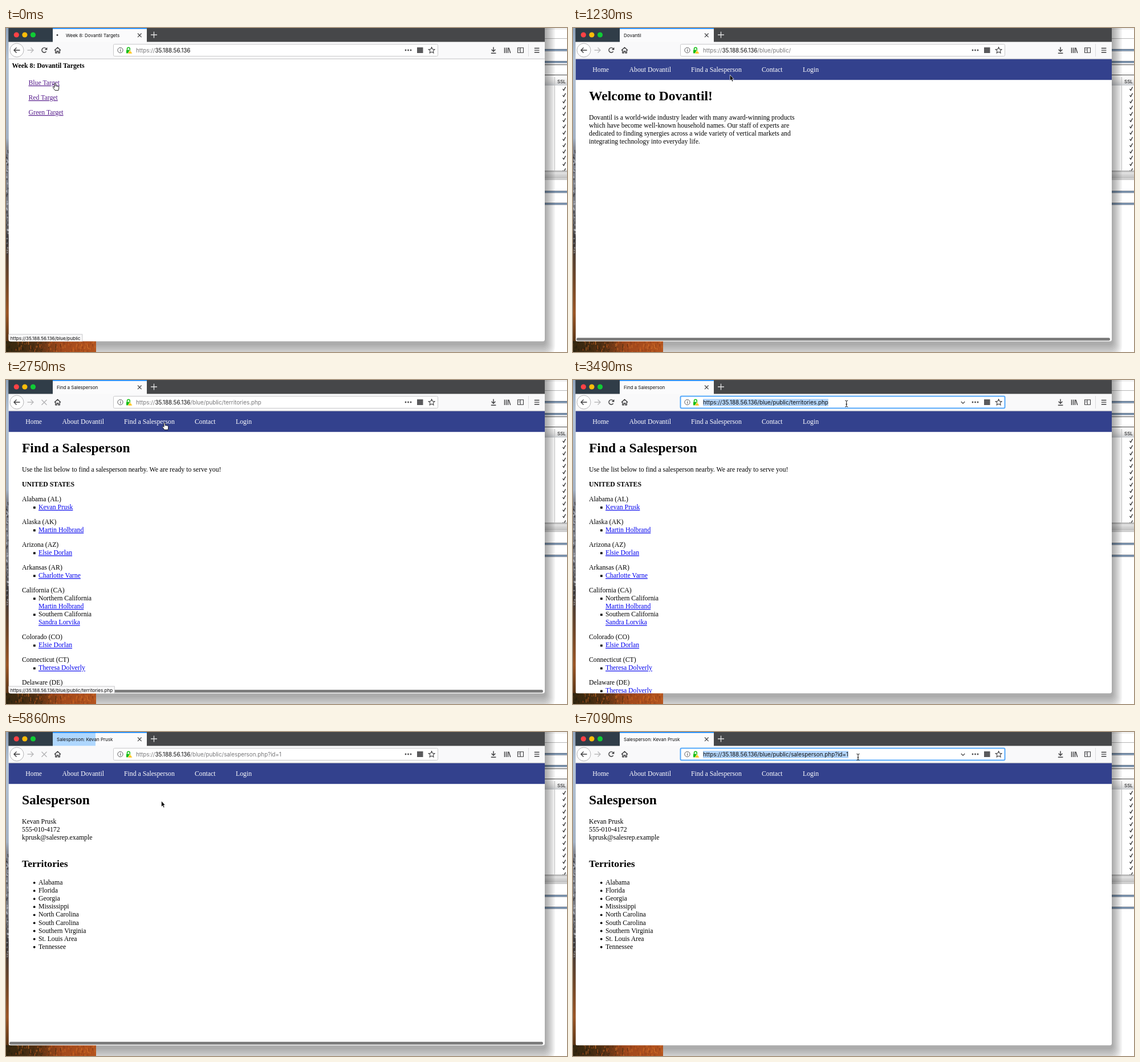
An HTML page that plays this animation: 984 px wide and 569 px high, repeating every 8000 ms.

```html
<!DOCTYPE html>
<html lang="en">
<head>
<meta charset="utf-8">
<title>Browser session</title>
<style>
html, body { margin: 0; width: 100%; height: 100%; overflow: hidden; background: #fff; }
svg { display: block; width: 984px; height: 569px; }
text { white-space: pre; }
.s { font: 11.76px "Liberation Serif", "Times New Roman", serif; }
.b { font-weight: bold; }
.h1 { font-size: 23.52px; }
.h2 { font-size: 17.64px; }
.link { fill: #0000ee; text-decoration: underline; }
.seen { fill: #551a8b; text-decoration: underline; }
.nav { fill: #fff; }
.ui { font: 8.02px Inter, "Open Sans", sans-serif; fill: #0c0c0d; }
.url { font-size: 9.84px; }
.ico { fill: none; stroke: #3c3c3e; stroke-width: 1.4; }
</style>
</head>
<body>
<svg id="stage" viewBox="0 0 984 569" xmlns="http://www.w3.org/2000/svg"></svg>
<script>
const LOOP = 8000, LINE = 14.12, GAP = 25.88;
const HOST = '35.188.56.136';

const TICKS = [0, 150, 310, 470, 610, 780, 940, 1090, 1230, 1380, 1680, 1830, 1980, 2120,
  2270, 2430, 2600, 2750, 2900, 3040, 3190, 3340, 3490, 3970, 4420, 4570, 4720, 4870, 5020,
  5320, 5470, 5710, 5860, 6010, 6180, 6340, 6490, 6640, 6940, 7090];

const PAGES = [
  { at: 0, title: 'Week 8: Dovantil Targets', path: '' },
  { at: 307, title: 'Dovantil', path: '/blue/public/', keepBar: true },
  { at: 2250, title: 'Find a Salesperson', path: '/blue/public/territories.php' },
  { at: 5735, title: 'Salesperson: Kevan Prusk', path: '/blue/public/salesperson.php?id=1' }
];
const LOADS = [[0, 307], [1980, 2250], [5470, 5735]];
const HINTS = [
  [0, 307, '/blue/public'],
  [1680, 2900, '/blue/public/territories.php'],
  [5320, 5735, '/blue/public/salesperson.php?id=1']
];
const FOCUS = [[3340, 5470], [6940, LOOP]];
const SELECT = [[3340, 3970], [6940, LOOP]];

const POINTER = [
  [0, 86, 97, 'hand'], [150, 88, 97, 'hand'], [310, 110, 97, 'arrow'], [470, 136, 96, 'arrow'],
  [780, 215, 92, 'arrow'], [1090, 277, 87, 'arrow'], [1380, 273.5, 77, 'hand'],
  [2600, 273.5, 77, 'hand'], [2750, 278, 75, 'hand'], [2900, 330, 66, 'arrow'],
  [3190, 440, 48, 'beam'], [3340, 480, 41.5, 'beam'], [4420, 478, 42, 'beam'],
  [4570, 400, 80, 'arrow'], [4720, 200, 180, 'arrow'], [4870, 87, 229, 'hand'],
  [5020, 92, 228.5, 'hand'], [5470, 92, 228.5, 'hand'], [5710, 180, 170, 'arrow'],
  [5860, 272.5, 121, 'arrow'], [6010, 340, 92, 'arrow'], [6340, 480, 54, 'arrow'],
  [6490, 496, 48, 'beam'], [6640, 500, 44, 'beam'], [LOOP, 500, 44, 'beam']
];

let seed = 11;
const rnd = () => (seed = seed * 16807 % 2147483647) / 2147483647;
const rect = (x, y, w, h, fill, more = '') =>
  `<rect x="${x}" y="${y}" width="${w}" height="${h}" fill="${fill}" ${more}/>`;
const text = (x, y, str, cls = 's', more = '') =>
  `<text x="${x}" y="${y}" class="${cls}" ${more}>${str}</text>`;
const path = (d, more = 'class="ico"') => `<path d="${d}" ${more}/>`;
const dot = (x, y, r, fill, more = '') => `<circle cx="${x}" cy="${y}" r="${r}" fill="${fill}" ${more}/>`;
const lines = (x, y, list) => list.map((str, i) => text(x, y + i * LINE, str)).join('');
const stops = list => list.map(([o, c]) => `<stop offset="${o}" stop-color="${c}"/>`).join('');
const fade = (id, list) => `<linearGradient id="${id}" x2="0" y2="1">${stops(list)}</linearGradient>`;

function desktop() {
  let out = rect(945, 0, 39, 569, '#fff');
  const rule = y => rect(945, y, 39, 3, '#a9c8e6') + rect(945, y, 39, 1, '#33435a') + rect(945, y + 2.5, 39, 1, '#33435a');
  out += rect(945, 0, 39, 3, '#f1f1f1') + rect(945, 18, 39, 1, '#b5b5b5');
  out += [37, 58, 286, 307].map(rule).join('');
  out += rect(945, 64, 39, 1, '#444') + rect(945, 82, 39, 1, '#444');
  out += rect(945, 86, 39, 15, 'url(#head)') + rect(962, 86, 1, 164, '#c4c4c4') + text(967, 96.5, 'SSL', 'ui', 'font-size="7.4"');
  for (let i = 0; i < 14; i++)
    out += path(`M976.5 ${107 + 11 * i}l1.8 2.6 3.2-6`, 'fill="none" stroke="#222" stroke-width="1.2"');
  out += rect(945, 250.5, 39, 14, 'url(#band)') + rect(945, 265.5, 39, 1, '#9a9a9a');
  for (let i = 1; i < 10; i++)
    out += rect(-30, -30, 975 + 2 * i, 584 + 3 * i, '#000', `rx="${4 + 2 * i}" opacity=".045"`);
  out += rect(0, 0, 5, 569, 'url(#sky)') + rect(0, 550, 158, 19, 'url(#wood)');
  const dark = ['#1d1b10', '#33290f', '#4c2c12'], warm = ['#c65a1c', '#8d3f18', '#d8752c', '#a8481a'];
  for (let i = 0; i < 230; i++) {
    const x = rnd() * 156, set = rnd() * 110 > x ? dark : warm;
    out += rect(x.toFixed(1), (549 + rnd() * 19).toFixed(1), 1.5, (2 + rnd() * 4).toFixed(1),
      set[Math.floor(rnd() * set.length)], 'opacity=".55"');
  }
  for (let i = 0; i < 60; i++)
    out += rect(rnd() * 3, 205 + rnd() * 190, 2, 3, rnd() < .45 ? '#c9ccd4' : '#2e2f34', 'opacity=".55"');
  return out;
}

function chrome() {
  const lights = ['#ff4245', '#fdbc0a', '#10cc35'].map((c, i) => dot(18.3 + 14.6 * i, 12, 4.6, c)).join('');
  return rect(4.5, 0, 940.5, 24.5, '#464749') + rect(4.5, 0, 77.5, 24.5, '#303d48') + lights +
    rect(82, 0, 165, 25, '#fbfbfc') + rect(82, 0, 0, 24.5, '#84c3ff', 'id="burst"') + rect(82, 0, 165, 1.6, '#0a84ff') +
    dot(90, 12.5, 1.4, '#333', 'id="throb"') + text(89, 15.7, '', 'ui', 'id="title"') +
    path('M231 9.5l6.6 6.6m0-6.6l-6.6 6.6', 'class="ico" style="stroke-width:1.1"') +
    path('M254 12h11m-5.5-5.5v11', 'fill="none" stroke="#e4e4e4" stroke-width="1.3"') +
    rect(4.5, 24.5, 940.5, 29.5, '#f9f9fa') + rect(4.5, 53.5, 940.5, 1, '#dcdcde') +
    dot(19, 39, 12, '#fff', 'stroke="#b4b4b6"') + path('M24.5 39H14m4.5-4.5L14 39l4.5 4.5') +
    path('M37.5 39H48m-4.5-4.5L48 39l-4.5 4.5', 'fill="none" stroke="#b9b9bb" stroke-width="1.4"') +
    '<g id="reload">' + path('M70.6 41.2A4.2 4.2 0 1 1 70.2 36') + path('M72.3 34v4.6h-4.6z', 'fill="#3c3c3e"') + '</g>' +
    path('M63 35l8 8', 'id="slash" class="ico"') + path('M62.5 34.7l9 9m0-9l-9 9', 'id="cross" class="ico"') +
    path('M85 39.3l5.5-5 5.5 5M86.8 38.5v5.3h2.4v-3h2.6v3h2.4v-5.3') +
    rect(188.5, 28.5, 569, 21, '#fff', 'id="box" rx="2"') +
    dot(200.5, 39, 4.6, 'none', 'stroke="#5c5c5e"') + rect(200, 38.2, 1.1, 3.4, '#5c5c5e') + rect(200, 36.3, 1.1, 1.1, '#5c5c5e') +
    path('M212.5 39v-2.4a2.4 2.4 0 0 1 4.8 0V39', 'fill="none" stroke="#14bd14" stroke-width="1.5"') + rect(211, 38.5, 7.5, 6, '#14bd14', 'rx=".8"') +
    path('M217.6 38.6l4 6.4h-8z', 'fill="#ffbf00" stroke="#fff" stroke-width=".6"') + rect(217.2, 40.7, .9, 2, '#fff') +
    rect(228, 33, 0, 13, '#b4d6fb', 'id="mark"') +
    '<text id="url" class="ui url" x="228" y="42.7"><tspan>https://</tspan><tspan>' + HOST + '</tspan><tspan></tspan></text>' +
    rect(453, 33.5, 1, 12, '#000', 'id="caret"') +
    path('M680.8 38l3.2 3.2 3.2-3.2', 'id="chev" class="ico" style="stroke-width:1.1"') +
    [701, 705.5, 710].map(x => dot(x, 39, 1.4, '#4a4a4c')).join('') + rect(721, 34, 10.5, 10, '#5a5a5c') +
    path('M746.6 33.7l1.6 3.5 3.8.4-2.8 2.6.8 3.8-3.4-1.9-3.4 1.9.8-3.8-2.8-2.6 3.8-.4z', 'class="ico" style="stroke-width:1.1"') +
    path('M855 33.5v7.5m-3.4-3.2l3.4 3.4 3.4-3.4M850.8 44.2h8.6') +
    path('M874.5 34.5v9.5m3-9.5v9.5m3-9.5v9.5m1.4-9.3l2.8 9.3') +
    path('M897.5 34.7h10v8.6h-10zM902.2 34.7v8.6', 'class="ico" style="stroke-width:1.1"') + path('M899 37h1.8m-1.8 2h1.8', 'class="ico" style="stroke-width:.8"') +
    rect(916, 28, 1, 22, '#dcdcde') + path('M926.8 35.5h8.6m-8.6 3.6h8.6m-8.6 3.6h8.6');
}

function listing() {
  const M = 'Martin Holbrand', E = 'Elsie Dorlan', D = 'Theresa Dolverly';
  const states = [['Alabama (AL)', 'Kevan Prusk'], ['Alaska (AK)', M], ['Arizona (AZ)', E],
    ['Arkansas (AR)', 'Charlotte Varne'],
    ['California (CA)', '-Northern California', M, '-Southern California', 'Sandra Lorvika'],
    ['Colorado (CO)', E], ['Connecticut (CT)', D], ['Delaware (DE)', D]];
  let y = 213, out = '';
  for (const [name, ...rows] of states) {
    out += text(28, y, name);
    rows.forEach((row, i) => {
      y += LINE;
      const plain = row[0] === '-';
      if (plain || i === 0) out += rect(48, y - 4.9, 3.7, 3.7, '#000');
      out += text(57, y, plain ? row.slice(1) : row, plain ? 's' : 's link');
    });
    y += GAP;
  }
  return out;
}

function pages() {
  const areas = ['Alabama', 'Florida', 'Georgia', 'Mississippi', 'North Carolina', 'South Carolina',
    'Southern Virginia', 'St. Louis Area', 'Tennessee'];
  const big = str => text(28, 127, str, 's b h1');
  const bodies = [
    text(10.5, 70, 'Week 8: Dovantil Targets', 's b') +
      ['Blue', 'Red', 'Green'].map((c, i) => text(39.5, 100 + i * 26, c + ' Target', 's seen')).join(''),
    big('Welcome to Dovantil!') + lines(28, 161, [
      'Dovantil is a world-wide industry leader with many award-winning products',
      'which have become well-known household names. Our staff of experts are',
      'dedicated to finding synergies across a wide variety of vertical markets and',
      'integrating technology into everyday life.']),
    big('Find a Salesperson') + text(28, 161, 'Use the list below to find a salesperson nearby. We are ready to serve you!') +
      text(28, 187, 'UNITED STATES', 's b') + listing(),
    big('Salesperson') + lines(28, 161, ['Kevan Prusk', '555-010-4172', 'kprusk@salesrep.example']) +
      text(28, 237, 'Territories', 's b h2') + lines(57, 268, areas) +
      areas.map((a, i) => dot(49.7, 264.8 + i * LINE, 1.9, '#000')).join('')
  ];
  const menu = [[34.3, 'Home'], [98.6, 'About Dovantil'], [207, 'Find a Salesperson'], [331, 'Contact'], [403, 'Login']];
  return '<g clip-path="url(#view)">' + rect(4.5, 54.5, 940.5, 496, '#fff') +
    bodies.map((b, i) => `<g id="page${i}">${b}</g>`).join('') +
    '<g id="menu">' + rect(4.5, 54.5, 940.5, 36.7, '#33418d') + menu.map(([x, s]) => text(x, 77, s, 's nav')).join('') + '</g>' +
    rect(6, 544, 936, 5, '#7d7d7d', 'id="bar" rx="2.5"') +
    '<g id="hint">' + rect(4, 538, 134, 14, '#f9f9fa', 'id="hintBox" stroke="#c8c8ca"') + text(7.8, 547.5, '', 'ui', 'id="hintText"') + '</g></g>';
}

const cursors =
  path('M0 0V10.4L2.3 8.3 3.9 12 5.6 11.2 4 7.6H6.8Z', 'id="arrow" fill="#000" stroke="#fff" stroke-width=".7"') +
  path('M-1 1.2a1.1 1.1 0 0 1 2.2 0V5l1-.4 1 .5 1.2-.1 1 .6.9.2.4.7V9L6 12.5H0L-3 8.5q-1.2-1.6.1-2.1.9-.2 1.9 1.2Z',
    'id="hand" fill="#fff" stroke="#111" stroke-width=".9" stroke-linejoin="round"') +
  path('M-2.5-5.5q2.5 0 2.5 1.4V4.1q0 1.4-2.5 1.4M2.5-5.5q-2.5 0-2.5 1.4M0 4.1q0 1.4 2.5 1.4M-1.3.9h2.6',
    'id="beam" fill="none" stroke="#111" stroke-width="1"');

document.getElementById('stage').innerHTML = '<defs>' +
  fade('head', [[0, '#fdfdfd'], [.5, '#e9e9e9'], [1, '#c9ccd0']]) +
  fade('band', [[0, '#9b9b9b'], [.25, '#e3e3e3'], [1, '#bdbdbd']]) +
  fade('sky', [[0, '#8fa3bb'], [.1, '#b4c4d6'], [.34, '#a3b2c5'], [.37, '#858a95'], [.56, '#74767d'],
    [.66, '#3f3a38'], [.78, '#6f4526'], [.88, '#9a5423'], [1, '#40280f']]) +
  `<linearGradient id="wood">${stops([[0, '#33270f'], [.35, '#553013'], [.6, '#a1491c'], [1, '#b3541f']])}</linearGradient>` +
  '<clipPath id="view"><path d="M4.5 54.5H945V546.5q0 4-4 4H8.500q-4 0-4-4z"/></clipPath></defs>' +
  desktop() + chrome() + pages() + '<g id="pointer">' + cursors + '</g>';

const $ = id => document.getElementById(id);
const set = (id, attrs) => { for (const k in attrs) $(id).setAttribute(k, attrs[k]); };
const show = (id, on) => $(id).setAttribute('display', on ? 'inline' : 'none');
const within = (list, t) => list.find(([a, b]) => t >= a && t < b);
const clamp = v => Math.max(0, Math.min(1, v));

function drawTab(t, page, load) {
  const age = t - page.at, burst = page.at > 0 && age < 340;
  show('burst', burst);
  if (burst) set('burst', { width: Math.min(165, age * .6), opacity: 1 - age / 340 });
  show('throb', load);
  if (load) set('throb', { cx: 94 - 4 * Math.cos((t - load[0]) / 140 * Math.PI) });
  set('title', { x: load ? 105 : 89 });
  $('title').textContent = page.title;

  const wait = load ? t - load[0] : -1;
  const settling = !load && page.at > 0 && age < 640;
  show('reload', load ? wait < 100 : !settling);
  show('slash', wait >= 100 && wait < 200);
  show('cross', settling || wait >= 200);
  $('cross').style.stroke = settling ? '#b4b4b6' : '#3c3c3e';
}

function drawUrl(t, page, hover) {
  const focus = within(FOCUS, t), picked = within(SELECT, t);
  const [scheme, host, rest] = $('url').children;
  rest.textContent = page.path;
  scheme.style.fill = rest.style.fill = focus ? '#0c0c0d' : '#777779';
  const end = $('url').getComputedTextLength();
  set('box', { stroke: focus ? '#55a9fb' : hover ? '#aaaaac' : '#c9c9cb', 'stroke-width': focus ? 2 : 1 });
  show('mark', picked);
  set('mark', { width: end });
  show('caret', focus && !picked);
  set('caret', { x: 228 + end });
  show('chev', focus);
}

function drawPointer(t) {
  const i = POINTER.findIndex(p => p[0] > t) - 1;
  const [t0, x0, y0, kind] = POINTER[i], [t1, x1, y1] = POINTER[i + 1];
  const k = (t - t0) / (t1 - t0);
  set('pointer', { transform: `translate(${x0 + (x1 - x0) * k} ${y0 + (y1 - y0) * k})` });
  for (const id of ['arrow', 'hand', 'beam']) show(id, id === kind);
  return kind;
}

function draw(now) {
  const clock = now % LOOP;
  const t = TICKS.filter(v => v <= clock).pop();
  const n = PAGES.filter(p => p.at <= t).length - 1, page = PAGES[n];
  PAGES.forEach((p, i) => show('page' + i, i === n));
  show('menu', n > 0);
  drawTab(t, page, within(LOADS, t));
  drawUrl(t, page, drawPointer(t) === 'beam');
  set('bar', { opacity: n === 0 ? 0 : page.keepBar ? 1 : clamp((1230 - (t - page.at)) / 80) });
  const hint = within(HINTS, t);
  show('hint', hint);
  if (hint) {
    $('hintText').textContent = 'https://' + HOST + hint[2];
    set('hintBox', { width: $('hintText').getComputedTextLength() + 7 });
  }
}

let start;
function frame(now) {
  start ??= now;
  draw(Math.max(0, now - start));
  requestAnimationFrame(frame);
}
draw(0);
requestAnimationFrame(frame);
</script>
</body>
</html>
```
